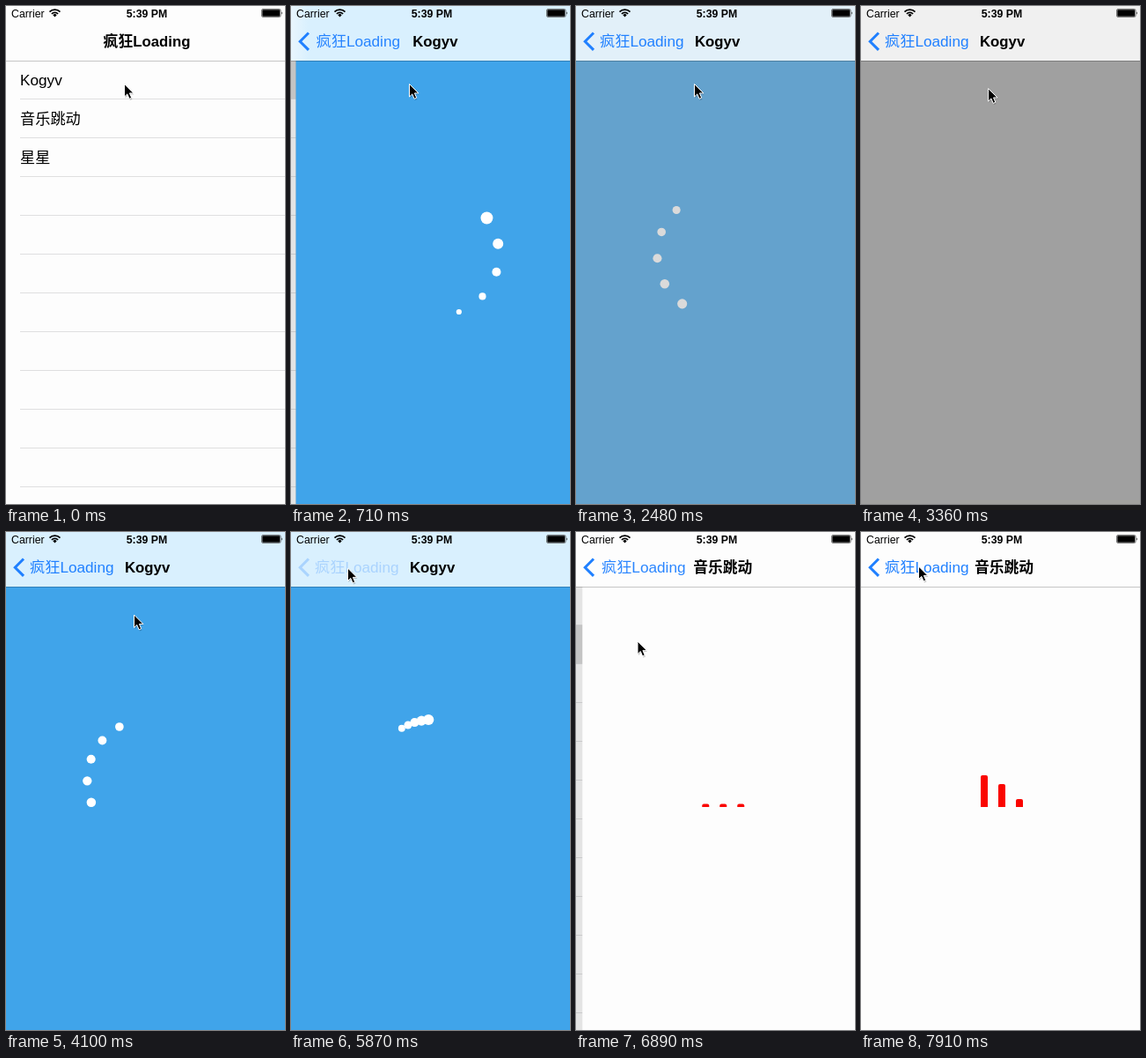
An HTML page for the animation above (8 s loop, 317 px wide and 565 px high).

```html
<!DOCTYPE html>
<html lang="zh">
<head>
<meta charset="utf-8">
<style>
  html, body { margin: 0; width: 100%; height: 100%; overflow: hidden; background: #fdfdfd; }
  svg { display: block; width: 100%; height: 100%; }
  text { font-family: 'Liberation Sans', 'Noto Sans CJK SC', 'Noto Sans CJK', sans-serif; font-size: 17.2px; white-space: pre; }
  .status { font-size: 12.3px; }
  .title { font-size: 16.8px; font-weight: bold; }
</style>
</head>
<body>
<svg viewBox="0 0 317 565" preserveAspectRatio="none">
  <defs>
    <linearGradient id="blend" gradientUnits="userSpaceOnUse" x1="0" x2="44">
      <stop offset="0" stop-color="#fdfdfd"/>
      <stop id="tint" offset="1" stop-color="#d9f0fe"/>
    </linearGradient>
  </defs>

  <rect width="317" height="565" fill="#fdfdfd"/>
  <g id="list">
    <rect id="hit" width="317" height="43" fill="#d9d9d9"/>
    <g id="lines" stroke="#dfdfe0"></g>
    <text x="16" y="90">Kogyv</text>
    <text x="16" y="134">音乐跳动</text>
    <text x="16" y="178">星星</text>
  </g>
  <rect id="dim" width="317" height="565"/>

  <g id="page">
    <rect id="back" width="317" height="565"/>
    <g id="loader">
      <rect width="317" height="565" fill="#40a4ea"/>
      <g id="dots" fill="#fff"></g>
    </g>
    <g id="bars" fill="#fa0500"></g>
  </g>

  <rect width="317" height="62" fill="#fdfdfd"/>
  <g id="nav"><rect width="700" height="62" fill="url(#blend)"/></g>
  <rect y="62" width="317" height="1" opacity=".22"/>

  <text id="listTitle" class="title" x="160" y="46" text-anchor="middle">疯狂Loading</text>
  <text id="pageTitle" class="title" y="46"></text>
  <path id="chevron" d="M20 30.500L10.300 40.200L20 49.900" fill="none" stroke="#2080ff" stroke-width="3"/>
  <text id="backText" x="27" y="46" fill="#2080ff">疯狂Loading</text>

  <text class="status" x="6" y="12.500">Carrier</text>
  <g fill="none" stroke="#000" stroke-width="1.700">
    <path d="M49.500 6.600A8.300 8.300 0 0 1 61.500 6.600M51.900 9A5 5 0 0 1 59.100 9"/>
  </g>
  <path d="M53.300 10.300A3 3 0 0 1 57.700 10.300L55.500 12.600Z"/>
  <text class="status" x="160" y="12.500" text-anchor="middle" font-weight="bold">5:39 PM</text>
  <rect x="290.500" y="3.500" width="21.500" height="9" rx="1.500" fill="none" stroke="#555" stroke-width=".8"/>
  <rect x="291.300" y="4.300" width="19.900" height="7.400" rx=".6"/>
  <path d="M313 6.300Q314.600 8 313 9.700Z"/>

  <g id="cursor">
    <path d="M1 2V16L4 13L6.500 18.500L9 17.500L6.500 12H11Z" opacity=".2"/>
    <path d="M0 0V14.500L3.300 11.400L5.600 16.800L8.200 15.700L5.900 10.400H10.400Z" stroke="#fff"/>
  </g>
</svg>
<script>
const $ = id => document.getElementById(id);
const set = (el, attrs) => { for (const k in attrs) el.setAttribute(k, attrs[k]); };
const add = (parent, tag, attrs) => {
  const el = document.createElementNS('http://www.w3.org/2000/svg', tag);
  set(el, attrs);
  return parent.appendChild(el);
};
const clamp = v => Math.min(1, Math.max(0, v));
const mix = (a, b, f) => a + (b - a) * f;
const shift = (el, x, y = 0) => set(el, { transform: `translate(${x} ${y})` });

const W = 317, LOOP = 8000, FIRST = 415, STEP = 146.9;
const PUSH_1 = 410, POP = 5914, PUSH_2 = 6595;

for (let y = 105.5; y < 565; y += 44) add($('lines'), 'path', { d: `M16 ${y}H320` });
const dots = [0, 1, 2, 3, 4].map(() => add($('dots'), 'circle', {}));
const bars = [136, 156, 176].map(() => add($('bars'), 'path', {}));

// Linear interpolation through [time, ...values] keys
function track(keys, t) {
  let i = 0;
  while (i < keys.length - 2 && t >= keys[i + 1][0]) i++;
  const [a, b] = [keys[i], keys[i + 1]];
  const f = (t - a[0]) / (b[0] - a[0]);
  return a.slice(1).map((v, n) => mix(v, b[n + 1], f));
}

const mouse = [
  [0, 134.5, 88.5], [3040, 134.5, 88.5], [3380, 145.5, 94], [5120, 145.5, 94],
  [5560, 64.5, 41], [6180, 64.5, 41], [6430, 70, 124], [7250, 70, 124],
  [7620, 65.5, 39], [8000, 65.5, 39]
];
const spin = [[709, 0.2135], [2472, 1.425], [4087, 2.468], [5850, 3.661]];

// Critically damped slide, 0 to 1
function slide(ms) {
  const x = Math.max(0, ms) / 50;
  const v = 1 - (1 + x) * Math.exp(-x);
  return v > 0.995 ? 1 : v;
}

// y of a cubic bezier (.5, y1, .25, 1) at x
function ease(x, y1) {
  let lo = 0, hi = 1, s;
  const at = (a, b) => 3 * (1 - s) ** 2 * s * a + 3 * (1 - s) * s * s * b + s ** 3;
  for (let i = 0; i < 20; i++) {
    s = (lo + hi) / 2;
    if (at(0.5, 0.25) < x) lo = s; else hi = s;
  }
  return at(y1, 1);
}

function drawDots(t) {
  const turn = track(spin, t)[0];
  const p = turn - Math.floor(turn);
  dots.forEach((dot, i) => {
    const rate = i / 5;
    const angle = 2 * Math.PI * ease(p, 0.15 + rate);
    set(dot, {
      cx: 161.5 + 69.2 * Math.sin(angle),
      cy: 282 - 69.2 * Math.cos(angle),
      r: 8.4 * mix(1 - rate, 0.2 + rate, p)
    });
  });
}

function drawBars(t) {
  bars.forEach((bar, i) => {
    const p = Math.max(0, 1.095 + (t - 7907) / 700 - i * 0.47) % 2;
    const h = 3.4 + 36 * (p > 1 ? 2 - p : p);
    set(bar, { d: `M${136 + i * 20} 312v${2 - h}q0 -2 2 -2h4q2 0 2 2v${h - 2}z` });
  });
}

function draw(time) {
  const k = Math.floor((time - FIRST) / STEP);
  const t = k < 0 ? 0 : FIRST + k * STEP;
  const music = t > 6500;
  const q = music ? slide(t - PUSH_2) : slide(t - PUSH_1) - slide(t - POP);
  const popping = !music && t > POP;

  // Pages
  shift($('list'), -95 * q);
  set($('dim'), { opacity: 0.1 * q });
  const x = W * (1 - q);
  shift($('page'), x);
  set($('hit'), { y: music ? 106 : 62, opacity: music || t >= FIRST && t < 3000 ? 1 : 0 });
  set($('back'), { fill: music ? '#fdfdfd' : '#a0a0a0' });

  const shown = t < 3000 ? 1 - clamp((t - 2385) / 225) : clamp((t - 3400) / 300);
  set($('loader'), { opacity: music ? 0 : shown });
  set($('bars'), { opacity: music ? 1 : 0 });
  drawDots(t);
  drawBars(t);

  // Navigation bar
  const tint = [217, 240, 254].map(c => Math.round(mix(240, c, shown)));
  set($('tint'), { 'stop-color': music ? '#fdfdfd' : `rgb(${tint})` });
  shift($('nav'), q === 1 ? -60 : q === 0 ? W : x - 30);
  shift($('listTitle'), -85 * q);
  set($('listTitle'), { opacity: clamp(1 - q * 12) });
  $('pageTitle').textContent = music ? '音乐跳动' : 'Kogyv';
  set($('pageTitle'), { x: music ? 129 : 135, opacity: clamp(q * 2) });
  shift($('pageTitle'), 183 * (1 - q));
  const press = t > 5690 && !music ? 0.25 : 1;
  set($('chevron'), { opacity: q ? press * clamp(0.4 + q) : 0, stroke: popping ? '#999' : '#2080ff' });
  set($('backText'), { opacity: press * q * q });
  shift($('backText'), 85 * (1 - q));

  shift($('cursor'), ...track(mouse, t));
}

const start = performance.now();
function tick() {
  draw((performance.now() - start) % LOOP);
  requestAnimationFrame(tick);
}
tick();
</script>
</body>
</html>
```
